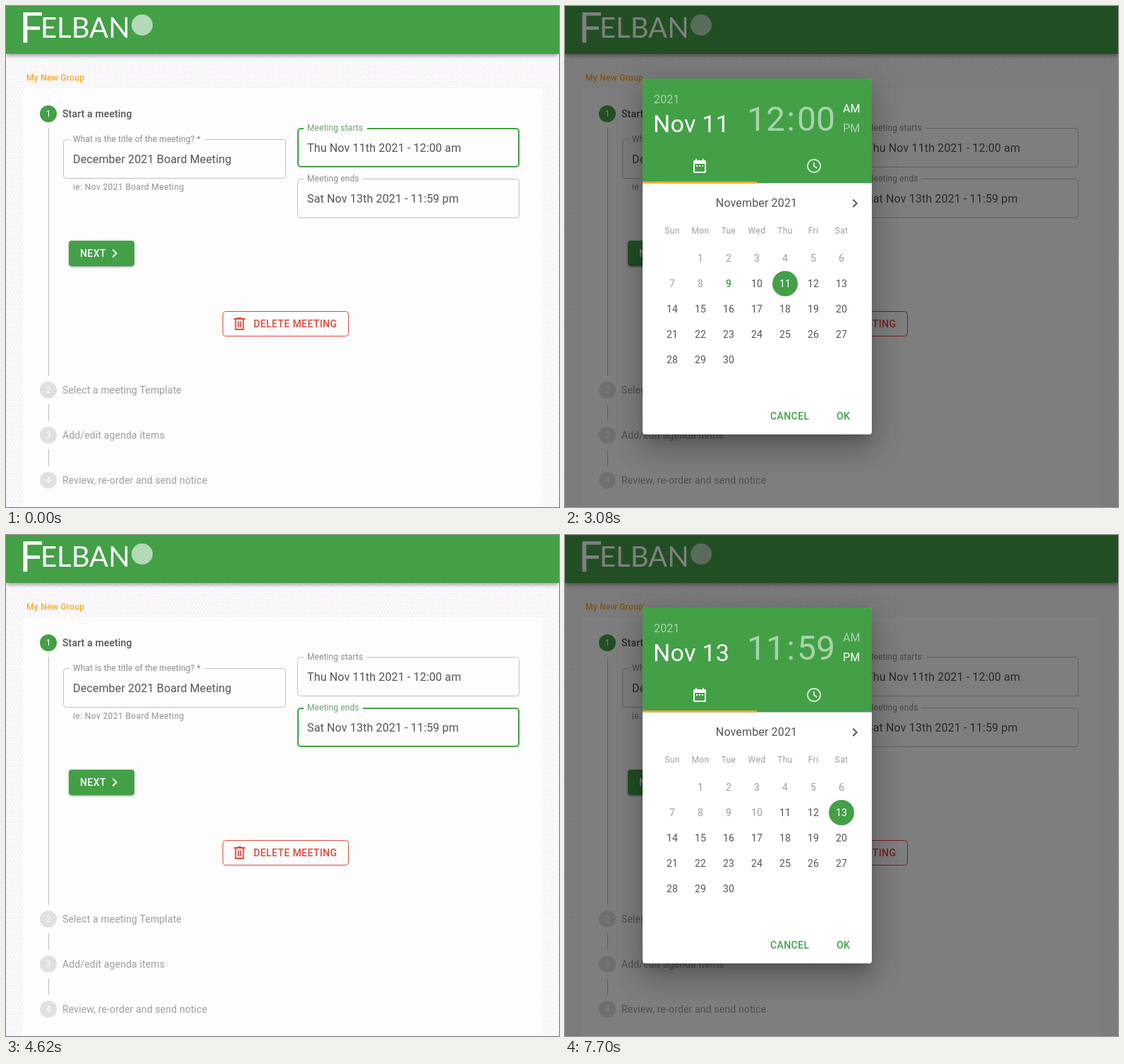
An HTML page for the animation above (8 s loop, 784 px wide and 711 px high).

```html
<!DOCTYPE html>
<html lang="en">
<head>
<meta charset="utf-8">
<title>Schedule a meeting</title>
<style>
  html, body { margin: 0; width: 100%; height: 100%; overflow: hidden; }
  svg { display: block; font-family: Roboto, sans-serif; }
  text { white-space: pre; }
</style>
</head>
<body>
<svg id="stage" width="784" height="711" viewBox="0 0 784 711"></svg>
<script>
const GREEN = '#43a047', ORANGE = '#f9a825', RED = '#dd4a3e', INK = '#555', MUTED = '#9d9d9d', CARD = '#fdfdfd';
const FADED = 'rgba(255,255,255,.54)';

const rect = (x, y, w, h, fill, more = '') =>
  `<rect x="${x}" y="${y}" width="${w}" height="${h}" fill="${fill}" ${more}/>`;
const circle = (x, y, r, fill) => `<circle cx="${x}" cy="${y}" r="${r}" fill="${fill}"/>`;
const text = (x, y, str, size, fill, spacing = .15, more = '') =>
  `<text x="${x}" y="${y}" font-size="${size}" fill="${fill}" letter-spacing="${spacing}" ${more}>${str}</text>`;
const icon = (x, y, d, style) => `<path transform="translate(${x} ${y})" d="${d}" ${style}/>`;

const MIDDLE = 'text-anchor="middle"', MEDIUM = 'font-weight="500"';
const CHEVRON = 'M10 6 8.6 7.4 13.2 12 8.6 16.6 10 18l6-6z';
const CALENDAR = 'M9 11H7v2h2zm4 0h-2v2h2zm4 0h-2v2h2zm2-7h-1V2h-2v2H8V2H6v2H5a2 2 0 0 0-2 2v14a2 2 0 0 0 2 2h14a2 2 0 0 0 2-2V6a2 2 0 0 0-2-2zm0 16H5V9h14z';
const CLOCK = 'M12 3a9 9 0 1 0 .01 0M12 7v5.3l4.2 2.5';
const TRASH = 'M4 5h16M9 4h6M6.5 6v14h11V6M10.4 8.5V17M13.6 8.5V17';

// Each layer is [offset, blur, spread, alpha], as in a CSS box shadow.
const shadow = (x, y, w, h, layers) => layers.map(([dy, blur, grow, alpha]) =>
  rect(x - grow, y - grow + dy, w + 2 * grow, h + 2 * grow, '#000',
    `rx="4" opacity="${alpha}" style="filter:blur(${blur / 2}px)"`)).join('');

function field(x, y, w, label, notch, value, focused) {
  const line = focused ? 2 : 1;
  return rect(x + line / 2, y + line / 2, w - line, 56 - line, 'none',
      `rx="4" stroke="${focused ? GREEN : '#c0c0c0'}" stroke-width="${line}"`) +
    rect(x + 9, y - 1, notch, 4, CARD) +
    text(x + 14, y + 4, label, 12, focused ? '#6d9f70' : '#8c8c8c', .11) +
    text(x + 14, y + 34, value, 16, INK);
}

function step(n, y, label) {
  const active = n === 1;
  return circle(60, y, 12, active ? GREEN : '#e0e0e0') +
    text(60, y + 4, n, 12, '#fff', 0, MIDDLE) +
    text(80, y + 5, label, 14, active ? INK : MUTED, .15, active ? MEDIUM : '');
}

function page(focus) {
  const links = [[173, 352], [565, 24], [629, 24]];
  return rect(0, 0, 784, 711, '#f7f5f7') + rect(0, 0, 784, 711, 'url(#dots)') +
    shadow(0, 0, 784, 68, [[2, 4, -1, .2], [4, 5, 0, .14], [1, 10, 0, .12]]) +
    rect(0, 0, 784, 68, GREEN) +
    `<g font-family="Lato, sans-serif">${text(19, 52, 'F', 60, '#fff', 0)}${text(49, 45, 'ELBAN', 40, '#fff', 0)}</g>` +
    circle(193, 27, 15, '#b4d9b6') +
    text(29, 106, 'My New Group', 12, ORANGE, .3, MEDIUM) +
    rect(24, 117, 736, 594, CARD) +
    links.map(([y, h]) => rect(60, y, 1, h, '#bdbdbd')).join('') +
    step(1, 153, 'Start a meeting') +
    step(2, 545, 'Select a meeting Template') +
    step(3, 609, 'Add/edit agenda items') +
    step(4, 673, 'Review, re-order and send notice') +
    field(81, 189, 316, 'What is the title of the meeting? *', 192, 'December 2021 Board Meeting') +
    text(95, 261, 'ie: Nov 2021 Board Meeting', 12, '#929292', .4) +
    field(413, 173, 315, 'Meeting starts', 90, 'Thu Nov 11th 2021 - 12:00 am', focus === 'starts') +
    field(413, 245, 315, 'Meeting ends', 84, 'Sat Nov 13th 2021 - 11:59 pm', focus === 'ends') +
    shadow(89, 333, 93, 36, [[3, 1, -2, .2], [2, 2, 0, .14], [1, 5, 0, .12]]) +
    rect(89, 333, 93, 36, GREEN, 'rx="4"') +
    text(105, 356, 'NEXT', 14, '#fff', .4, MEDIUM) +
    icon(142, 339, CHEVRON, 'fill="#fff"') +
    rect(307.5, 433.5, 178, 35, 'none', `rx="4" stroke="${RED}"`) +
    icon(319, 439, TRASH, `fill="none" stroke="${RED}" stroke-width="1.9"`) +
    text(351, 456, 'DELETE MEETING', 14, RED, .4, MEDIUM);
}

const ring = y =>
  `<ellipse cx="557" cy="${y}" rx="149.3" ry="37.3" fill="none" stroke="#d8230f" stroke-width="1.9"/>`;

function dialog(selected, firstOpen, today, hour, minute, pm) {
  let days = '';
  for (let d = 1; d <= 30; d++) {
    const x = 152 + d % 7 * 40, y = 358 + Math.floor(d / 7) * 36;
    if (d === selected) days += circle(x, y, 18, GREEN);
    const color = d === selected ? '#fff' : d < firstOpen ? MUTED : d === today ? GREEN : INK;
    days += text(x, y + 5, d, 14, color, .15, MIDDLE + (d === today ? MEDIUM : ''));
  }
  const weekdays = ['Sun', 'Mon', 'Tue', 'Wed', 'Thu', 'Fri', 'Sat'].map((name, i) =>
    text(152 + i * 40, 323, name, 12, MUTED, .4, MIDDLE)).join('');
  return rect(0, 0, 784, 711, 'rgba(0,0,0,.5)') +
    shadow(110, 103, 325, 505, [[11, 15, -7, .2], [24, 38, 3, .14], [9, 46, 8, .12]]) +
    rect(110, 103, 325, 505, '#fff', 'rx="4"') +
    `<path d="M110 251V107a4 4 0 0 1 4-4H431a4 4 0 0 1 4 4V251z" fill="${GREEN}"/>` +
    rect(110, 251, 325, 1, '#b9c9ba') + rect(110, 249, 162, 2.5, ORANGE) +
    text(126, 138, '2021', 16, FADED) +
    text(125, 179, 'Nov ' + selected, 34, '#fff', .25) +
    text(258, 177, hour, 48, FADED, 0) +
    text(320, 177, ':', 48, FADED, 0, MIDDLE) +
    text(329, 177, minute, 48, FADED, 0) +
    text(394, 151, 'AM', 16, pm ? FADED : '#fff') +
    text(394, 179, 'PM', 16, pm ? '#fff' : FADED) +
    icon(179, 215, CALENDAR, 'fill="#fff"') +
    icon(341, 215, CLOCK, 'fill="none" stroke="#fff" stroke-width="2" opacity=".75"') +
    text(271.5, 285, 'November 2021', 16, INK, .15, MIDDLE) +
    icon(399, 268, CHEVRON, `fill="${INK}"`) +
    weekdays + days +
    text(291, 587, 'CANCEL', 14, GREEN, .4, MEDIUM) +
    text(385, 587, 'OK', 14, GREEN, .4, MEDIUM);
}

const scenes = [
  page('starts'),
  page('starts') + ring(195),
  page() + dialog(11, 9, 9, '12', '00', false),
  page('ends'),
  page('ends') + ring(271.5),
  page() + dialog(13, 11, 0, '11', '59', true),
];

const stage = document.getElementById('stage');
stage.innerHTML = `<defs><pattern id="dots" width="9" height="8" patternUnits="userSpaceOnUse">
  ${[[2, 2], [6, 1.5], [4, 5], [8, 6]].map(([x, y]) => circle(x, y, 1.2, '#fff')).join('')}
</pattern></defs>` + scenes.map(s => `<g class="scene">${s}</g>`).join('');
const layers = stage.querySelectorAll('.scene');

const LOOP = 8000, HOLD = 1000, PERIOD = 1540, TICK = 60, STEPS = 10;

// Every scene dissolves over the one before it in ten even steps.
function draw(now) {
  const t = now % LOOP;
  layers.forEach((layer, i) => {
    const start = HOLD + (i - 1) * PERIOD;
    const mix = (Math.floor((t - start) / TICK) + 1) / STEPS;
    layer.setAttribute('opacity', i ? Math.min(1, Math.max(0, mix)) : 1);
  });
  requestAnimationFrame(draw);
}
draw(performance.now());
</script>
</body>
</html>
```
